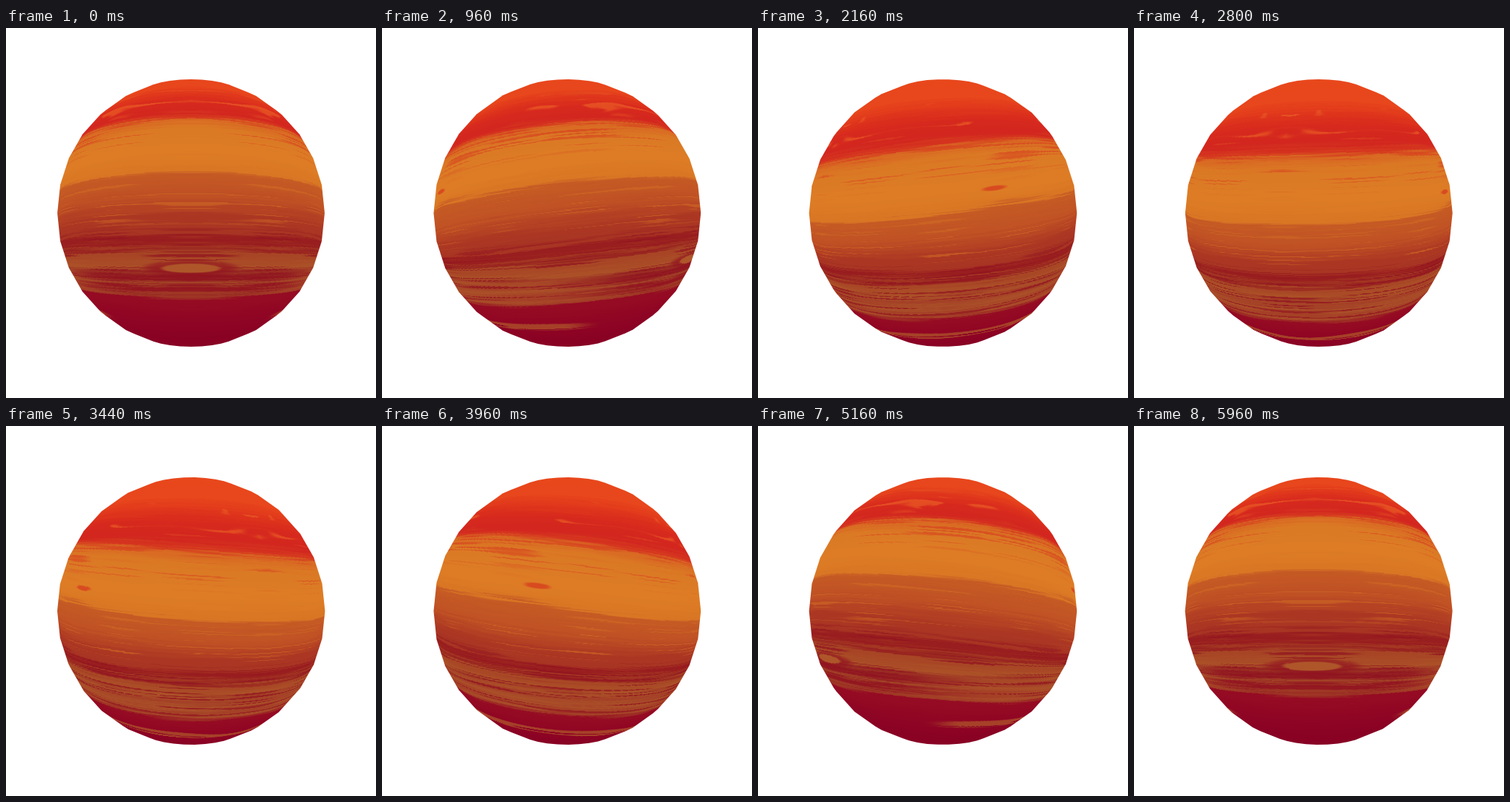
An HTML page with a canvas that plays this animation: 512 px wide and 512 px high, repeating every 6 s.

```html
<!DOCTYPE html>
<html lang="en">
<head>
<meta charset="utf-8">
<title>Banded planet</title>
<style>
  html, body { margin: 0; width: 100%; height: 100%; overflow: hidden; background: #fff; }
  canvas { display: block; width: 100vmin; height: 100vmin; margin: 0 auto; }
</style>
</head>
<body>
<canvas id="stage" width="512" height="512"></canvas>
<script>
const SIZE = 512, MID = SIZE / 2;
const LOOP = 6000, STEP = 40;
const FOCAL = 549, DIST = 3.125;        // perspective camera, unit sphere
const SLICES = 32, RINGS = 16;          // mesh that shapes the outline
const RES = 4;                          // texels per degree
const TEX_W = 180 * RES, TEX_H = 180 * RES;
const RAD = Math.PI / 180;

const ctx = document.getElementById('stage').getContext('2d');
const layer = document.createElement('canvas');
layer.width = layer.height = SIZE;
const layerCtx = layer.getContext('2d');

const clamp = v => Math.max(0, Math.min(1, v));
const mix = (a, b, k) => a + (b - a) * k;
const smooth = (lo, hi, v) => { const k = clamp((v - lo) / (hi - lo)); return k * k * (3 - 2 * k); };
const zone = (a, b, c, d, v) => smooth(a, b, v) * (1 - smooth(c, d, v));
const rgb = hex => [hex >> 16, hex >> 8 & 255, hex & 255];

function hash(x, y) {
  let h = Math.imul(x, 374761393) + Math.imul(y, 668265263);
  h = Math.imul(h ^ h >>> 13, 1274126177);
  return ((h ^ h >>> 16) >>> 0) / 4294967296;
}

function noise(x, y) {
  const ix = Math.floor(x), iy = Math.floor(y);
  let u = x - ix, v = y - iy;
  u *= u * (3 - 2 * u);
  v *= v * (3 - 2 * v);
  return mix(mix(hash(ix, iy), hash(ix + 1, iy), u),
             mix(hash(ix, iy + 1), hash(ix + 1, iy + 1), u), v);
}

// Band colours by latitude along the seam, north to south
const BANDS = [
  [90, 0xe94a1c], [54, 0xe8461c], [47, 0xdf351c], [42, 0xd82a1e], [36, 0xd2261f],
  [33.6, 0xd6381f], [32, 0xd96a23], [28, 0xdb7a25], [20, 0xde7d26], [13.6, 0xd97624],
  [12.4, 0xc65b25], [5, 0xbf5024], [2, 0xb64424], [-1, 0xac3823], [-6, 0xa83423],
  [-7.4, 0x981c1f], [-8.8, 0x9a201f], [-10, 0xa53a23], [-11.5, 0x982220],
  [-13, 0xa74425], [-17, 0xac5228], [-19, 0x9a2e23], [-20.5, 0x8f1220],
  [-23, 0xa54a27], [-25, 0x921420], [-27.7, 0xa03c26], [-29.5, 0x960c23],
  [-38, 0x910624], [-50, 0x8a0224], [-110, 0x840224]
].map(([at, hex]) => [at, rgb(hex)]);

function bandColor(b) {
  let i = 1;
  while (i < BANDS.length - 1 && BANDS[i][0] > b) i++;
  const [hi, c] = BANDS[i - 1], [lo, d] = BANDS[i];
  const k = clamp((hi - b) / (hi - lo));
  return c.map((v, n) => mix(v, d[n], k));
}

const EMBER = rgb(0xe95a24), OCHRE = rgb(0xae562a), SPOT = rgb(0xd84a20);
const WINE = rgb(0x921420), AMBER = rgb(0xd06a24);

function tint(c, to, k) {
  for (let n = 0; n < 3; n++) c[n] = mix(c[n], to[n], k);
}

const oval = (x, y, cx, cy, rx, ry) => Math.hypot((x - cx) / rx, (y - cy) / ry);

function surface(lon, lat) {
  // bands sink away from the seam, most near the equator
  const tilt = 8 - 2 * smooth(8, 30, Math.abs(lat));
  const b = lat + tilt * (1 - Math.cos(lon * RAD));
  const broad = noise(lon / 36 + 9, b / 2.4) - 0.5;
  const fine = noise(lon / 26, b * 1.5 + 40) - 0.5;
  const thin = noise(lon / 16 + 31, b * 3.2) - 0.5;
  const c = bandColor(b + broad * 1.3 + fine * 1.8 + thin * 1.6);

  // swirls in the red cap
  const cap = zone(35, 39, 48, 53, b);
  if (cap > 0) {
    const w = noise(lon / 18, b / 4);
    const q = noise(lon / 20 + 2.5 * w, b / 1.7 + 2 * w);
    tint(c, EMBER, cap * 0.75 * smooth(0.6, 0.85, q));
  }
  // red threads in the upper yellow band
  const upper = zone(19, 30, 32, 34, b);
  if (upper > 0) tint(c, SPOT, upper * 0.8 * smooth(0.62, 0.85, noise(lon / 26 + 70, b * 2)));
  // pale threads in the orange belt
  const belt = zone(-6, 0, 11, 13, b);
  if (belt > 0) tint(c, AMBER, belt * 0.6 * smooth(0.72, 0.9, noise(lon / 26 + 5, b * 2.2)));
  // southern belt turns ochre away from the seam, with dark threads
  const south = zone(-29, -27, -19, -17, b);
  tint(c, OCHRE, south * 0.65 * smooth(25, 70, lon));
  const dark = zone(-29, -26, -8, -2, b);
  if (dark > 0) tint(c, WINE, dark * 0.75 * smooth(0.62, 0.82, noise(lon / 30 + 17, b * 1.9)));
  // ochre ribbon in the far south
  const ribbon = 1 - smooth(1.2, 2.2, Math.abs(b + 41 - 3 * broad));
  tint(c, OCHRE, ribbon * smooth(40, 60, lon) * smooth(0.25, 0.5, fine + 0.6) * 0.75);
  // oval eye at the seam and the small red spot
  const eye = oval(lon, b, 0, -17.6, 10, 1.6);
  tint(c, WINE, 0.6 * (1 - smooth(1.3, 1.9, eye)));
  tint(c, OCHRE, 1 - smooth(0.85, 1.1, eye));
  tint(c, SPOT, 1 - smooth(0.5, 1.1, oval(lon, b, 113, 19, 5, 1)));
  return c;
}

function buildTexture() {
  const tex = new Uint32Array(TEX_W * TEX_H);
  for (let y = 0; y < TEX_H; y++) {
    const lat = 90 - (y + 0.5) / RES;
    if (Math.abs(lat) > 76) continue;
    for (let x = 0; x < TEX_W; x++) {
      const [r, g, b] = surface((x + 0.5) / RES, lat);
      tex[y * TEX_W + x] = (255 << 24 | b << 16 | g << 8 | r) >>> 0;
    }
  }
  return tex;
}

// Where each screen pixel meets the sphere
function castRays() {
  const hits = [];
  for (let py = 68; py < 444; py++) {
    for (let px = 68; px < 444; px++) {
      const x = (px + 0.5 - MID) / FOCAL, y = (MID - py - 0.5) / FOCAL;
      const a = x * x + y * y + 1;
      const disc = Math.max(0, DIST * DIST - a * (DIST * DIST - 1));
      if (disc === 0 && Math.hypot(px - MID, py - MID) > 188) continue;
      const s = (DIST - Math.sqrt(disc)) / a;
      const X = x * s, Y = y * s, Z = DIST - s;
      const lat = Math.asin(Y / Math.hypot(X, Y, Z)) / RAD;
      hits.push({
        at: py * SIZE + px,
        lon: Math.atan2(X, Z) / RAD,
        row: Math.floor((90 - lat) * RES) * TEX_W
      });
    }
  }
  return hits;
}

function project(lat, lon) {
  const flat = Math.cos(lat * RAD);
  const k = FOCAL / (DIST - flat * Math.cos(lon * RAD));
  return [MID + k * flat * Math.sin(lon * RAD), MID - k * Math.sin(lat * RAD)];
}

function hull(points) {
  points.sort((p, q) => p[0] - q[0] || p[1] - q[1]);
  const half = list => {
    const out = [];
    for (const p of list) {
      while (out.length > 1) {
        const [a, b] = out.slice(-2);
        if ((b[0] - a[0]) * (p[1] - a[1]) - (b[1] - a[1]) * (p[0] - a[0]) > 0) break;
        out.pop();
      }
      out.push(p);
    }
    return out.slice(0, -1);
  };
  return [...half(points), ...half(points.slice().reverse())];
}

function outline(angle) {
  const points = [];
  for (let r = 1; r < RINGS; r++) {
    for (let s = 0; s < SLICES; s++) {
      points.push(project(90 - r * 180 / RINGS, angle + s * 360 / SLICES));
    }
  }
  return hull(points);
}

const texture = buildTexture();
const hits = castRays();
const image = layerCtx.createImageData(SIZE, SIZE);
const pixels = new Uint32Array(image.data.buffer);

function draw(angle) {
  for (const h of hits) {
    let lon = (h.lon - angle + 720) % 360;
    if (lon > 180) lon = 360 - lon;
    pixels[h.at] = texture[h.row + Math.min(TEX_W - 1, Math.floor(lon * RES))];
  }
  layerCtx.putImageData(image, 0, 0);

  ctx.fillStyle = '#fff';
  ctx.fillRect(0, 0, SIZE, SIZE);
  ctx.save();
  ctx.beginPath();
  for (const [x, y] of outline(angle)) ctx.lineTo(x, y);
  ctx.closePath();
  ctx.clip();
  ctx.drawImage(layer, 0, 0);
  ctx.restore();
}

let shown = -1;
function tick() {
  const step = Math.floor(performance.now() % LOOP / STEP);
  if (step !== shown) {
    shown = step;
    draw(step * STEP / LOOP * 360);
  }
  requestAnimationFrame(tick);
}
tick();
</script>
</body>
</html>
```
